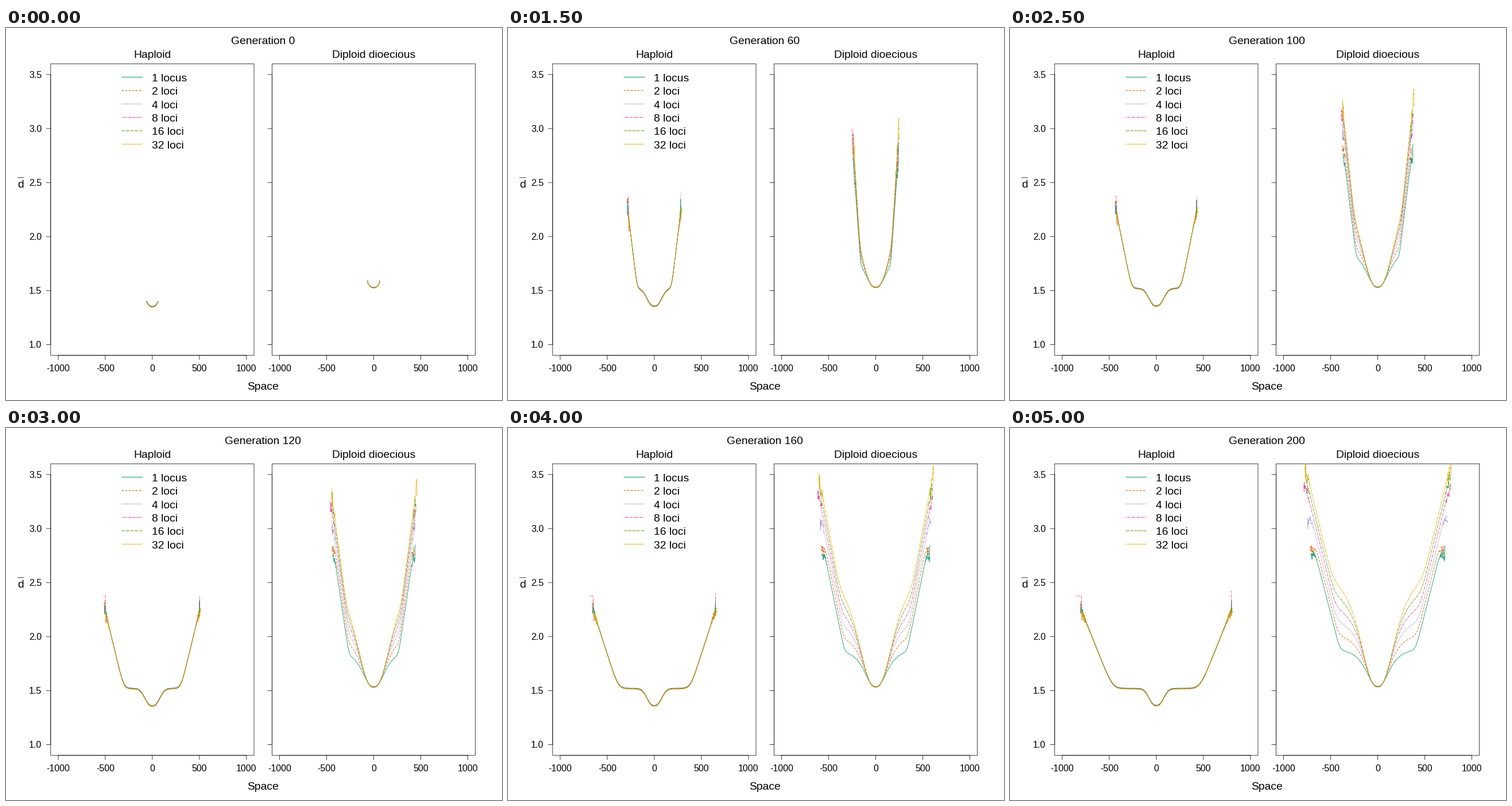
A matplotlib script for the animation above (5500 ms loop, 864 by 648 pixels).

```python
import numpy as np
import matplotlib.pyplot as plt
from matplotlib.animation import FuncAnimation
from matplotlib.patches import Rectangle

W, H = 864, 648
TOP, BOTTOM = 62.3, 570.2
LEFTS, SPAN = (77.8, 463.4), 354.2
CENTERS = [left + SPAN / 2 for left in LEFTS]
UNIT_X, UNIT_Y = 0.164, 188.15
DASH = 0.75

COLORS = ["#1B9E77", "#D95F02", "#7570B3", "#E7298A", "#66A61E", "#E6AB02"]
DASHES = ["", "44", "13", "1343", "73", "2262"]

plt.rcParams["font.family"] = "Liberation Sans"
plt.rcParams["lines.scale_dashes"] = False
fig = plt.figure(figsize=(W / 72, H / 72), dpi=72, facecolor="white")
ax = fig.add_axes([0, 0, 1, 1])
ax.set_xlim(0, W)
ax.set_ylim(H, 0)
ax.axis("off")


def py(v):
    return BOTTOM - (v - 0.9) * UNIT_Y


def stroke(xs, ys, color="black", dashes="", lw=0.75):
    line, = ax.plot(xs, ys, color=color, lw=lw, snap=False)
    if dashes:
        line.set_dashes([DASH * int(n) for n in dashes])
        line.set_dash_capstyle("round")
    return line


def label(x, y, s, size=19.2, ha="center"):
    return ax.text(x, y, s, fontsize=size, ha=ha, va="baseline")


def softplus(x, w):
    return w * np.logaddexp(0, x / w)


def smoothstep(t):
    t = np.clip(t, 0, 1)
    return t * t * (3 - 2 * t)


def haploid(d, g, i):
    """Central dip, flat shelf, then a straight rise that moves outward."""
    dip = py(1.35 + 0.00005 * g)
    y = dip + (py(1.517) - dip) * (1 - np.exp(-(d / 16) ** 2.5))
    if g:
        y = y - 500 / g * softplus(d - 10 - 0.33 * g, 0.025 * g)
    return y - 0.9 + 0.36 * i


def diploid(d, g, i):
    """Fixed inner shoulder, higher with more loci, and a moving outer rise."""
    r = (d / (24 + 2.4 * i)) ** 2.5
    h = (68 + 28.5 * i) * r / (1 + r)
    if g:
        q = i / 5
        knee = 9 + (0.285 + 0.015 * q) * g + 0.00025 * q * g * g
        h = h + 770 / g * softplus(d - knee, (0.012 + 0.01 * q) * g)
        ceiling = 230 + 158 * smoothstep((i - 0.5) / 3.5)
        h = ceiling - softplus(ceiling - h, 6)
    return 452.5 - 0.009 * g - h - 0.8 + 0.3 * i


def extent(panel, g, i):
    if panel == 0:
        return 10.3 + 0.608 * g
    q = smoothstep((i - 1) / 2)
    return 10.3 + (0.5 - 0.04 * q) * g + (0.0002 + 0.00045 * q) * g * g


def half_curve(panel, g, i, side):
    """Distance from the centre and y for one side, ragged near the edge."""
    rng = np.random.default_rng(1000 * panel + 10 * i + side + 5)
    end = extent(panel, g, i)
    end += rng.uniform(-1.5, 1) * min(1, g / 60)
    d = np.linspace(0, end, int(end * 5) + 20)
    y = (diploid if panel else haploid)(d, g, i)
    if g:
        tail = 2 + 0.05 * g
        amp = 4 + 330 / max(g, 40) + 2 * panel
        step = ((end - d) / 0.6).astype(int)
        jumps = rng.normal(0, 1, step.max() + 1)
        y = y + amp * np.clip((d - end + tail) / tail, 0, 1) * jumps[step]
    elif panel:
        d, y = np.append(d, end), np.append(y, 440)
    # The 8-loci haploid edge stands out: a ledge on the left, a spike right
    if panel == 0 and i == 3 and g >= 40:
        run = max(0, 0.075 * g - 5) * (side < 0)
        peak = py(2.375 if side < 0 else 2.5 - 16 / g)
        d, y = np.append(d, [end, end + run]), np.append(y, [peak, peak])
    return d, y


def draw_panel(left, center, name, numbers):
    frame = Rectangle((left, TOP), SPAN, BOTTOM - TOP, fill=False,
                      ec="black", lw=0.75, snap=False)
    ax.add_patch(frame)
    label(center, 52, name)
    ticks = np.arange(-1000, 1001, 500)
    for v in ticks:
        x = center + v * UNIT_X
        stroke([x, x], [BOTTOM, BOTTOM + 7.5])
        label(x, 598.5, str(v), 16)
    stroke(center + ticks[[0, -1]] * UNIT_X, [BOTTOM, BOTTOM])
    for v in np.arange(1, 3.6, 0.5):
        stroke([left - 7.5, left], [py(v), py(v)])
        if numbers:
            label(62.3, py(v) + 5.8, f"{v:.1f}", 16, "right")
    stroke([left, left], [py(1), py(3.5)])
    return frame


title = label(447.5, 28, "")
label(447.3, 630, "Space")
label(25.4, 278, "d")
stroke([20, 31], [260.8, 260.8])

curves = {}
for p, name in enumerate(["Haploid", "Diploid dioecious"]):
    frame = draw_panel(LEFTS[p], CENTERS[p], name, p == 0)
    for i, color in enumerate(COLORS):
        curves[p, i] = stroke([], [], color, DASHES[i], 0.9)
        curves[p, i].set_clip_path(frame)

for i, color in enumerate(COLORS):
    y = 85.6 + 23.35 * i
    stroke([202, 238], [y, y], color, DASHES[i], 1.1)
    label(254.5, y + 7.4, f"{2 ** i} " + ("loci" if i else "locus"), ha="left")


def update(k):
    g = 20 * k
    title.set_text(f"Generation {g}")
    for (p, i), line in curves.items():
        dl, yl = half_curve(p, g, i, -1)
        dr, yr = half_curve(p, g, i, 1)
        line.set_data(CENTERS[p] + np.concatenate([-dl[::-1], dr]),
                      np.concatenate([yl[::-1], yr]))
    return [title, *curves.values()]


anim = FuncAnimation(fig, update, frames=11, interval=500, repeat=True,
                     repeat_delay=0, blit=False)
plt.show()
```
